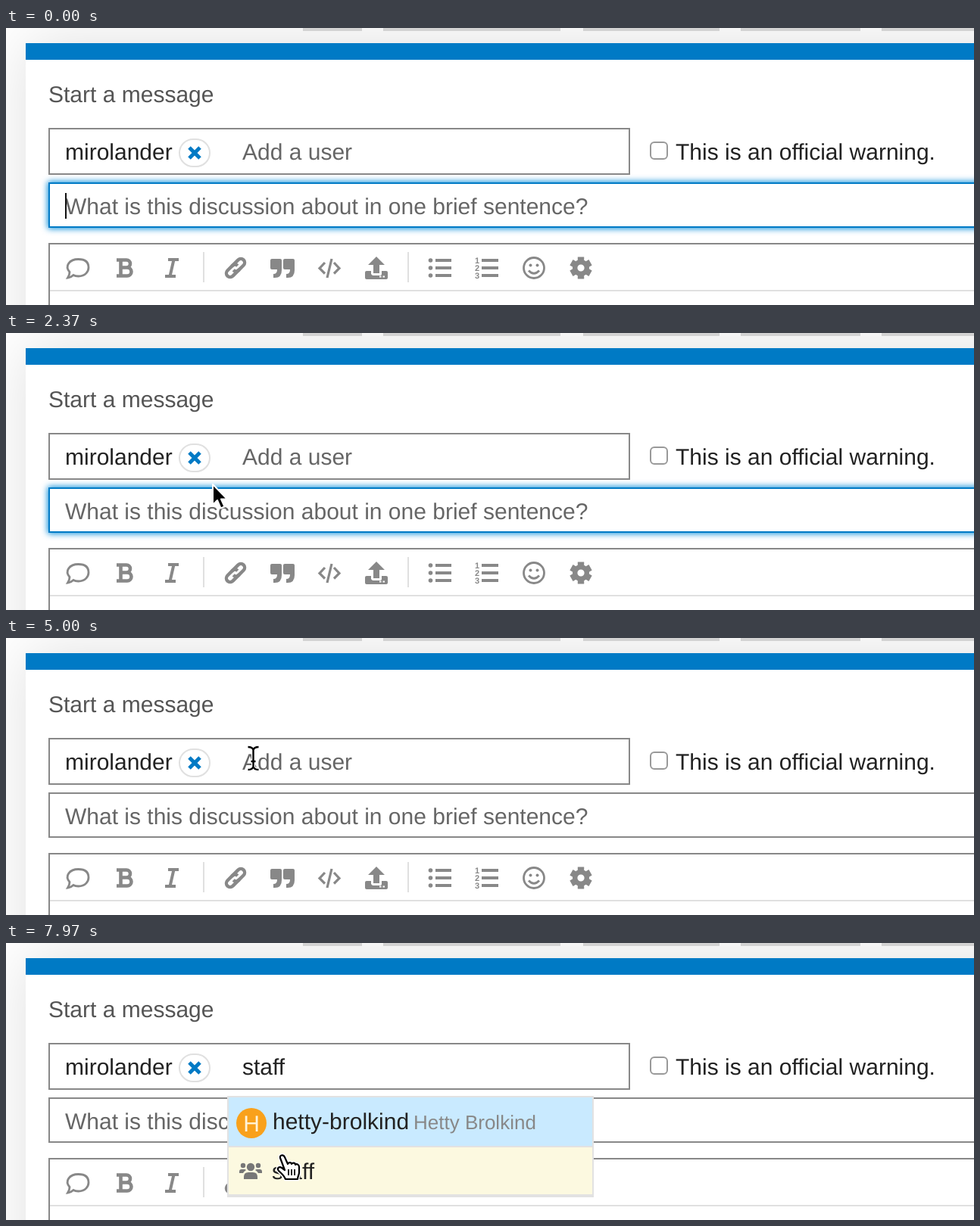
Animation, 1278 px wide and 366 px high, one loop 8 s. Source, as an HTML page:

```html
<!DOCTYPE html>
<html lang="en">
<head>
<meta charset="utf-8">
<title>Start a message</title>
<style>
html, body { margin: 0; width: 100%; height: 100%; overflow: hidden; background: #fff; }
svg { display: block; width: 1278px; height: 366px; }
text { font: 30px "Liberation Sans", Arial, sans-serif; fill: #222; text-rendering: geometricPrecision; }
.soft { fill: #666; }
.line { fill: none; stroke: currentColor; }
.solid { fill: currentColor; }
</style>
</head>
<body>
<svg viewBox="0 0 1278 366">
  <defs>
    <filter id="shade" filterUnits="userSpaceOnUse" x="-120" y="-120" width="1700" height="900"><feGaussianBlur stdDeviation="40"/></filter>
    <filter id="blur" filterUnits="userSpaceOnUse" x="20" y="170" width="1400" height="130"><feGaussianBlur stdDeviation="4.5"/></filter>
  </defs>

  <path d="M392 0h78v4h-78zM498 0h234v4H498zM762 0h180v4H762zM970 0h158v4H970zM1156 0h122v4h-122z" fill="#dcdcdc"/>
  <rect x="26" y="18" width="1500" height="700" opacity=".12" filter="url(#shade)"/>
  <path d="M26 20h1252v346H26z" fill="#fff"/>
  <path d="M26 20h1252v22H26z" fill="#007ac5"/>
  <text x="56" y="98" style="fill:#555">Start a message</text>

  <rect id="glow" x="55" y="203" width="1300" height="62" fill="#0088d8" filter="url(#blur)"/>
  <rect x="57" y="133" width="766" height="60" fill="#fff" stroke="#888" stroke-width="2"/>
  <text x="78" y="174">mirolander</text>
  <rect x="229" y="147" width="40" height="36" rx="18" fill="#fff" stroke="#e0e0e0" stroke-width="2"/>
  <path d="M242 158l14 14m0-14l-14 14" stroke="#007ac5" stroke-width="5"/>
  <text id="user" x="312" y="174"></text>
  <rect x="851" y="151" width="22" height="22" rx="5" fill="#fff" stroke="#999" stroke-width="2"/>
  <text x="884" y="174">This is an official warning.</text>

  <rect x="57" y="205" width="1300" height="58" fill="#fff" stroke="#888" stroke-width="2"/>
  <rect id="focus" x="57" y="205" width="1300" height="58" fill="none" stroke="#007ac5" stroke-width="2"/>
  <text class="soft" x="78" y="246">What is this discussion about in one brief sentence?</text>

  <path d="M57 380V285h1300" fill="none" stroke="#888" stroke-width="2"/>
  <path d="M58 347h1220M261 296v40M531 296v40" stroke="#e0e0e0" stroke-width="2"/>
  <g id="tools"></g>

  <rect id="caret" width="2" height="34" fill="#111"/>

  <g id="menu">
    <path d="M292 202h484v134H292z" fill="#e2e2e2"/>
    <path d="M294 204h480v64H294z" fill="#c9eaff"/>
    <path id="row" d="M294 270h480v62H294z"/>
    <circle cx="324" cy="238" r="20" fill="#f9a11b"/>
    <text x="324" y="249" text-anchor="middle" style="fill:#fff3d8">H</text>
    <text x="352" y="246">hetty-brolkind</text>
    <text x="538" y="246" style="font-size:26px;fill:#888">Hetty Brolkind</text>
    <g fill="#777">
      <circle cx="323" cy="296" r="5.2"/><circle cx="313" cy="294" r="3.2"/><circle cx="333" cy="294" r="3.2"/>
      <path d="M314 312v-3q0-6 6-6h6q6 0 6 6v3zM308 304v-2q0-3 3-3h4q1 0 2 1-3 2-4 4zM338 304v-2q0-3-3-3h-4q-1 0-2 1 3 2 4 4z"/>
    </g>
    <text x="351" y="312">staff</text>
  </g>

  <g id="cursor" stroke-linejoin="round">
    <path id="arrow" d="M0 0V27l6-6 4.5 10.5 5-2-4.5-10H19Z" fill="#000" stroke="#fff" stroke-width="2"/>
    <g id="beam" fill="none">
      <path d="M-7-15q6 0 7 4 1-4 7-4M0-11V11M-7 15q6 0 7-4 1 4 7 4M-3 4h6" stroke="#fff" stroke-width="5"/>
      <path d="M-7-15q6 0 7 4 1-4 7-4M0-11V11M-7 15q6 0 7-4 1 4 7 4M-3 4h6" stroke="#000" stroke-width="2.4"/>
    </g>
    <g id="hand">
      <path d="M-3 3c-1-4 4-5 6-1l4 9c1-3 5-2 5 0 1-2 5-2 5 1 2-2 5 0 5 3l0 7c0 4-2 5-2 9H4c-2-5-5-7-9-11-3-4 1-6 4-4l4 3Z" fill="#fff" stroke="#fff" stroke-width="5"/>
      <path d="M-3 3c-1-4 4-5 6-1l4 9c1-3 5-2 5 0 1-2 5-2 5 1 2-2 5 0 5 3l0 7c0 4-2 5-2 9H4c-2-5-5-7-9-11-3-4 1-6 4-4l4 3Z" fill="#fff" stroke="#000" stroke-width="2.2"/>
      <path d="M8 18v8m4-8v8m4-8v8" stroke="#000" stroke-width="1.8"/>
    </g>
  </g>
</svg>
<script>
const $ = id => document.getElementById(id);
const show = (id, on) => $(id).setAttribute('visibility', on ? 'visible' : 'hidden');
const clamp = v => Math.max(0, Math.min(1, v));
const LOOP = 8000, FADE = 200;

// Toolbar icons
const line = (d, w) => `<path class="line" d="${d}" stroke-width="${w}"/>`;
const solid = d => `<path class="solid" d="${d}"/>`;
const dot = (x, y, r) => `<circle class="solid" cx="${x}" cy="${y}" r="${r}"/>`;
const rows = f => [307, 317, 327].map(f).join('');
const quote = x => solid(`M${x} 305h11q2 0 2 2v13q0 10-9 10h-2v-5q5 0 5-6h-7q-2 0-2-2v-10q0-2 2-2z`);
const chain = 'M2 5H-10a5 5 0 0 1 0-10H-1a5 5 0 0 1 5 5';
const icons = [
  [95, line('M84 322.5C77 314 84 305.5 95.5 305.5s13.5 6 13.5 11-4 11.5-13.5 11.5q-4 0-6.500-1.500-3 3-7.500 3.500 2.500-4 2.500-7.500z', 2.8)],
  [157, line('M146 306.500h13a5 5 0 0 1 0 10h-7m7 0h1a5.500 5.500 0 0 1 0 11H146M151.500 307v21', 4.6)],
  [219, line('M214 306h14M210 328h14M221.500 306l-5 22', 4)],
  [303, `<g transform="translate(303 317) rotate(-45)">${line(chain, 4.4)}<g transform="rotate(180)">${line(chain, 4.4)}</g></g>`],
  [365, quote(351) + quote(368)],
  [427, line('M421 310l-7 7.500 7 7M433 310l7 7.500-7 7M430 305l-6 25', 3.2)],
  [489, solid('M489 302l11 11h-7v11h-8v-11h-7zM476 321h6v4q1 2 3 2h8q3 0 3-2v-4h6q2 0 2 2v7q0 2-2 2h-26q-2 0-2-2v-7q0-2 2-2z') +
    '<path d="M493 328.500h2.500m2 0h2.500" stroke="#fff" stroke-width="2"/>'],
  [573, rows(y => dot(560.500, y, 2.8)) + line(rows(y => `M567 ${y}h21`), 4)],
  [635, rows((y, i) => `<text class="solid" x="619" y="${y + 4}" style="font-size:11px;font-weight:bold;fill:currentColor">${i + 1}</text>`) +
    line(rows(y => `M628 ${y}h22`), 4)],
  [697, line('M710.500 317a13.500 13.500 0 1 0-27 0a13.500 13.500 0 1 0 27 0M690 320.500q7 7.500 14 0', 2.8) + dot(692.500, 313.500, 2) + dot(701.500, 313.500, 2)],
  [759, '<circle class="line" cx="759" cy="317" r="7.800" stroke-width="6.400"/>' +
    [0, 60, 120].map(a => `<path class="line" d="M759 302.500v6m0 17v6" stroke-width="8.400" transform="rotate(${a} 759 317)"/>`).join('')]
];
$('tools').innerHTML = icons.map(([x, art]) =>
  `<g><rect x="${x - 31}" y="286" width="62" height="60" fill="#919191"/>${art}</g>`).join('');
const tools = [...$('tools').children];

// Button index: pointer enters, pointer leaves
const hovers = { 9: [1130, 1455], 8: [1430, 1495], 7: [1495, 1552], 6: [1578, 1655], 5: [1655, 1680] };
function hoverLevel(i, t) {
  if (!hovers[i]) return 0;
  const [a, b] = hovers[i];
  return t < b ? clamp((t - a) / FADE) : clamp(clamp((b - a) / FADE) - (t - b) / FADE);
}

// Pointer moves: [time, x, y]
const moves = [
  [[930, 722, 376], [1200, 706, 338], [1400, 690, 326], [1500, 594, 322], [1700, 430, 275], [1950, 305, 218], [2200, 273, 200]],
  [[2370, 273, 200], [2720, 292, 66], [2950, 305, 84], [3250, 320, 150], [3700, 326.5, 159]],
  [[7050, 326.5, 159], [7300, 336, 190], [7600, 355, 250], [7800, 363, 276], [7970, 365, 281]]
];
function pointer(t) {
  const path = moves.filter(m => m[0][0] <= t).pop();
  if (!path) return null;
  const i = path.findIndex(p => p[0] > t);
  if (i < 0) return path[path.length - 1].slice(1);
  const a = path[i - 1], b = path[i], d = b[0] - a[0], u = (t - a[0]) / d;
  const slope = (k, c) => path[k - 1] && path[k + 1]
    ? (path[k + 1][c] - path[k - 1][c]) / (path[k + 1][0] - path[k - 1][0]) * d : 0;
  return [1, 2].map(c => {
    const p = slope(i - 1, c), q = slope(i, c), r = b[c] - a[c];
    return a[c] + u * (p + u * (3 * r - 2 * p - q + u * (p + q - 2 * r)));
  });
}
function pointerKind(x, y, menu) {
  if (menu && y > 202 && x > 292) return 'hand';
  if (y > 286 && y < 346) return 'hand';
  if (y > 346 || (y > 204 && y < 264) || (y > 132 && y < 194 && x > 296)) return 'beam';
  return 'arrow';
}

// Typing
const keys = [5270, 5600, 5930, 6200, 6430];
const stops = [0, 15, 23.3, 40, 48.4, 56.7];

function draw(t) {
  const typed = keys.filter(k => k <= t).length;
  const user = $('user');
  user.textContent = typed ? 'staff'.slice(0, typed) : 'Add a user';
  user.setAttribute('class', typed ? '' : 'soft');

  const inUser = t >= 4070;
  const since = inUser ? t - (typed ? keys[typed - 1] : 4070) : t + 300;
  show('caret', since % 1000 < 500 && (t < 3970 || inUser));
  $('caret').setAttribute('x', inUser ? 312 + stops[typed] : 78);
  $('caret').setAttribute('y', inUser ? 146 : 218);

  const focus = 1 - clamp((t - 3990) / 200);
  $('focus').setAttribute('opacity', focus);
  $('glow').setAttribute('opacity', focus);

  tools.forEach((g, i) => {
    const h = hoverLevel(i, t), c = Math.round(136 + 94 * h);
    g.firstChild.setAttribute('opacity', h);
    g.style.color = `rgb(${c},${c},${c})`;
  });

  const menu = t >= 6970, pos = pointer(t);
  show('menu', menu);
  const visible = pos && (t < keys[0] || t >= 7050);
  const kind = visible ? pointerKind(pos[0], pos[1], menu) : '';
  for (const k of ['arrow', 'beam', 'hand']) show(k, k === kind);
  if (visible) $('cursor').setAttribute('transform', `translate(${pos})`);
  $('row').setAttribute('fill', visible && menu && pos[1] > 270 ? '#fcf9e0' : '#fff');
}

const start = performance.now();
function tick() {
  draw((performance.now() - start) % LOOP);
  requestAnimationFrame(tick);
}
tick();
</script>
</body>
</html>
```
